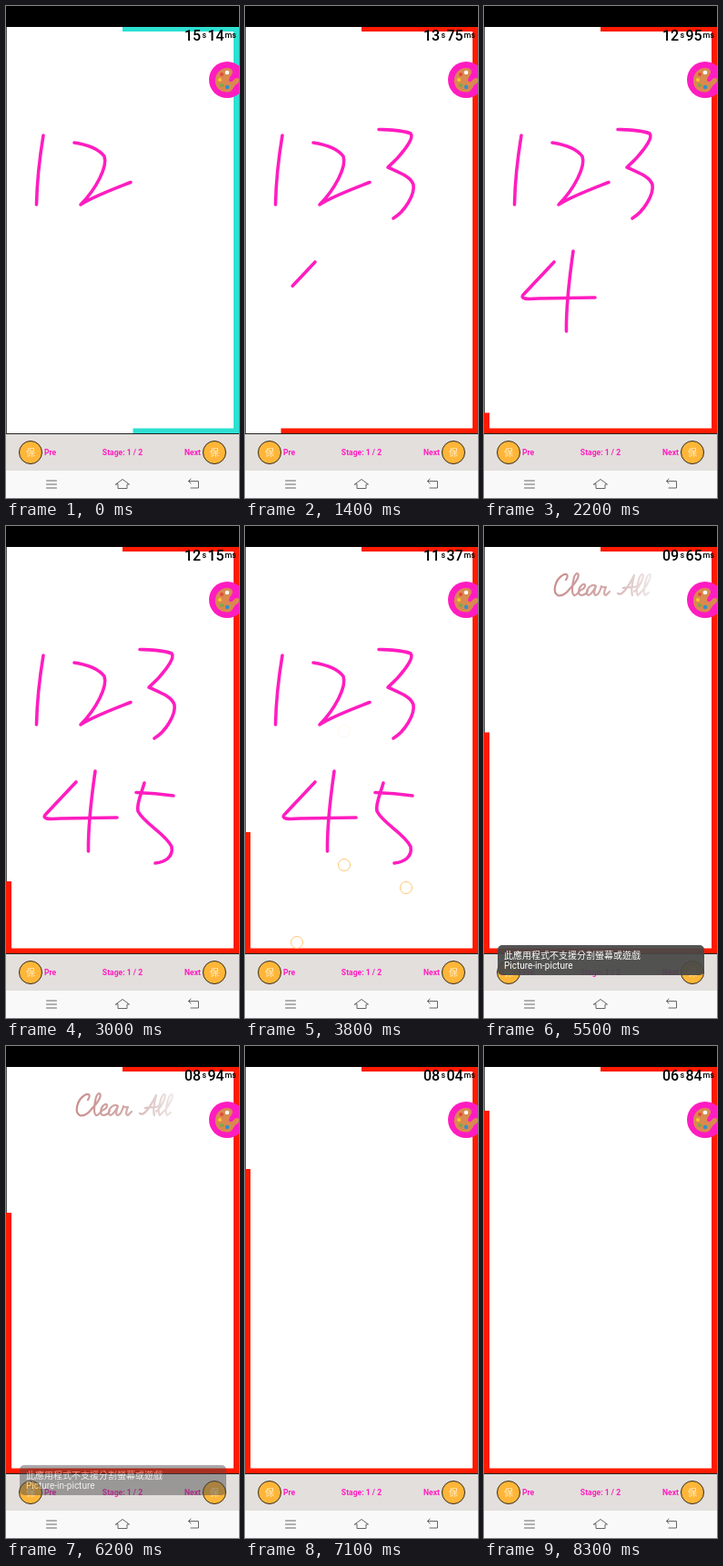
Animation of 256 by 540 pixels, one loop 8.4 s. Source, as an HTML page:

```html
<!DOCTYPE html>
<html lang="en">
<head>
<meta charset="utf-8">
<style>
  html, body { margin: 0; width: 100%; height: 100%; overflow: hidden; background: #fff; }
  svg { display: block; width: 256px; height: 540px; font-family: Roboto, sans-serif; }
  .line { fill: none; stroke-linecap: round; stroke-linejoin: round; }
  .label { font-size: 8.6px; font-weight: 700; fill: #ff1dc0; }
  .unit { font-size: 9px; }
  .cjk { font-family: "Noto Sans CJK TC", "Noto Sans CJK", sans-serif; font-size: 10px; }
</style>
</head>
<body>
<svg viewBox="0 0 256 540">
  <defs>
    <linearGradient id="fade" gradientUnits="userSpaceOnUse" x1="77" x2="183" y1="0" y2="0">
      <stop offset="0" stop-color="#c98f8f"/>
      <stop offset=".6" stop-color="#d3b0ae"/>
      <stop offset="1" stop-color="#efe8e8"/>
    </linearGradient>
    <g id="button">
      <circle r="12.5" fill="#ffb638" stroke="#33291c"/>
      <text class="cjk" y="3.7" text-anchor="middle" fill="#fff3d8">保</text>
    </g>
  </defs>

  <rect width="256" height="540" fill="#fff"/>
  <path d="M.5 23V469" stroke="#555" stroke-width="1"/>
  <path id="border" d="M128 25H253V466.5H3V25" fill="none" stroke-width="6"/>
  <rect width="256" height="23"/>

  <g id="ink" class="line" stroke="#ff1dc0" stroke-width="3.6"></g>
  <g id="rings" fill="none" stroke="#ffc66e"></g>

  <g id="cleared" class="line" stroke="url(#fade)" stroke-width="2.2" role="img" aria-label="Clear All">
    <path d="M90 59C94 53 90 51 85 55C78 60 75 73 81 76C86 78 92 72 95 68
      C103 60 106 52 102 52C98 53 95 74 99 76C102 77 104 71 107 70
      C112 68 112 63 109 64C104 66 102 76 107 76C111 76 113 73 114 71
      M123 66C118 62 112 70 113 74C114 79 120 73 123 66C121 71 120 76 123 76
      C126 75 128 70 129 66C129 68 133 67 134 67C132 71 131 76 134 76L138 72"/>
    <path d="M147 74C152 78 160 64 165 54C163 62 161 71 163 76M153 68C158 67 164 68 168 66
      M165 72C172 66 177 53 174 53C170 53 166 74 169 76L172 73
      C180 66 185 53 182 53C178 53 174 74 177 76L181 73"/>
  </g>

  <g font-weight="500">
    <text id="seconds" x="196" y="38" font-size="16"></text>
    <text class="unit" x="215.5" y="35">s</text>
    <text id="hundredths" x="221.5" y="38" font-size="16"></text>
    <text class="unit" x="240.5" y="35">ms</text>
  </g>

  <circle cx="243" cy="81" r="20" fill="#ff1dc0"/>
  <path d="M242 68C234 69 229 76 230 84C231 92 239 96 246 94C250 92 250 88 253 86
    C257 84 257 79 254 79C250 79 250 84 246 83C243 81 248 76 249 73C249 69 246 68 242 68Z" fill="#d98a4e"/>
  <circle cx="243" cy="73" r="2.3" fill="#fff"/>
  <circle cx="237" cy="75" r="2" fill="#e3483c"/>
  <circle cx="235" cy="81" r="2.1" fill="#f7c52d"/>
  <circle cx="237" cy="87" r="2" fill="#7aa84b"/>
  <circle cx="243" cy="89" r="2.2" fill="#2b95c4"/>

  <rect y="469" width="256" height="41" fill="#e3dfdc"/>
  <path d="M0 469.5H256" stroke="#222"/>
  <use href="#button" x="27" y="490"/>
  <use href="#button" x="229" y="490"/>
  <text class="label" x="42" y="493">Pre</text>
  <text class="label" x="128" y="493" text-anchor="middle">Stage: 1 / 2</text>
  <text class="label" x="196" y="493">Next</text>

  <rect y="510" width="256" height="30" fill="#f9f9f9"/>
  <path class="line" stroke="#666" d="M44.5 521H55.5M44.5 525H55.5M44.5 529H55.5
    M120.5 525L128 519.5L135.5 525H133V529.5H123V525Z
    M203 519L200.500 521.500L203 524M200.500 521.500H211.500V529H203"/>

  <g id="toast">
    <rect x="15" y="460" width="227" height="33" rx="5" fill="#484848" fill-opacity=".93"/>
    <text class="cjk" x="22" y="474.500" fill="#fff">此應用程式不支援分割螢幕或遊戲</text>
    <text x="22" y="486" font-size="10" fill="#fff">Picture-in-picture</text>
  </g>
</svg>

<script>
const LOOP = 8400, STEP = 100, CLEAR_AT = 4200;
const $ = id => document.getElementById(id);
const clamp = v => Math.max(0, Math.min(1, v));
const ramp = (t, from, to) => clamp((t - from) / (to - from));

function add(parent, tag, attrs) {
  const el = document.createElementNS("http://www.w3.org/2000/svg", tag);
  for (const key in attrs) el.setAttribute(key, attrs[key]);
  return parent.appendChild(el);
}

// Each pen stroke: start time, end time, path
const strokes = [
  [-2, -1, "M41 142C37 166 34 193 33.500 218"],
  [-2, -1, "M75 150C88 152 102 157 108 165C112 176 99 201 82 218C96 209 118 201 137 193.500"],
  [150, 850, "M147 135.500C160 136 173 136 182 140C187 145 170 166 157 177C170 183 182 187 185 196C187 207 175 226 163 233"],
  [1250, 1800, "M77 281L44 316C38 322 48 322 60 321L122 320"],
  [1950, 2200, "M98 269C95 290 90 325 90.500 357"],
  [2300, 2700, "M152 282C149 293 143 305 145 313C152 327 176 338 182 352C184 363 175 369 164 370"],
  [2800, 2950, "M143 292.500C158 293 170 294 184 296"]
].map(([start, end, d]) => ({ start, end, el: add($("ink"), "path", { d, pathLength: 1 }) }));

// Rings that flash up before the clearing: x, y, peak time
const rings = [[109, 225, 3450], [109, 372, 3800], [177, 397, 3800], [57, 457, 3800]]
  .map(([cx, cy, peak]) => ({ peak, el: add($("rings"), "circle", { cx, cy, r: 6.5 }) }));

// Time, drawn border length, countdown in hundredths
const progress = [
  [0, 680, 1514], [1400, 780, 1375], [3000, 893, 1215], [3800, 947, 1137],
  [4700, 1007, 1046], [6200, 1100, 894], [8300, 1212, 684]
];

function valueAt(t, column) {
  const i = Math.max(1, progress.findIndex(row => row[0] >= t));
  const a = progress[i - 1], b = progress[i];
  return a[column] + (b[column] - a[column]) * ramp(t, a[0], b[0]);
}

function draw(t) {
  const count = Math.round(valueAt(t, 2));
  const pad = n => String(n).padStart(2, "0");
  $("seconds").textContent = pad(Math.floor(count / 100));
  $("hundredths").textContent = pad(count % 100);

  $("border").setAttribute("stroke", count >= 1500 ? "#2ce0d2" : "#ff1a00");
  $("border").setAttribute("stroke-dasharray", valueAt(t, 1) + " 2000");

  for (const { start, end, el } of strokes) {
    const drawn = ramp(t, start, end);
    el.style.visibility = drawn > 0 && t < CLEAR_AT ? "visible" : "hidden";
    el.setAttribute("stroke-dasharray", drawn < 1 ? drawn + " 2" : "none");
  }
  for (const { peak, el } of rings) el.style.opacity = clamp(1 - Math.abs(t - peak) / 400);

  $("cleared").style.opacity = ramp(t, CLEAR_AT - 100, 4500) * (1 - ramp(t, 6600, 7100));
  $("toast").style.opacity = ramp(t, 4300, 4600) * (1 - ramp(t, 5950, 6450));
}

const begin = performance.now();
function frame() {
  const elapsed = (performance.now() - begin) % LOOP;
  draw(Math.floor(elapsed / STEP) * STEP);
  requestAnimationFrame(frame);
}
frame();
</script>
</body>
</html>
```
